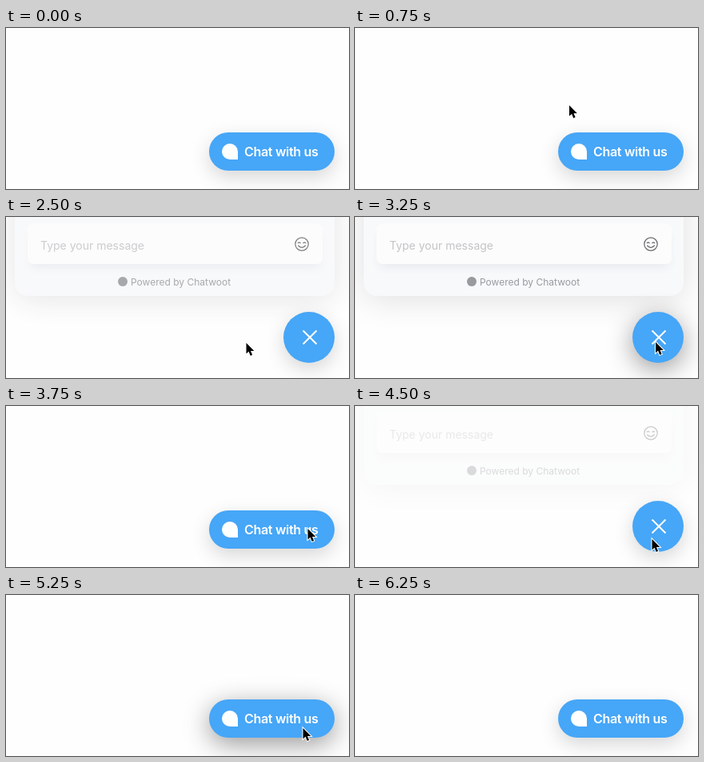
These frames come from a looping animation (429x202 px, 7000 ms). An HTML page:

```html
<!DOCTYPE html>
<html lang="en">
<head>
<meta charset="utf-8">
<title>Chat widget</title>
<style>
  html, body { margin: 0; width: 100%; height: 100%; overflow: hidden; background: #fefefe; }
  body { position: relative; font-family: Inter, sans-serif; }
  body *, svg { position: absolute; box-sizing: border-box; white-space: nowrap; }

  #panel {
    left: 11px; top: -501px; width: 400px; height: 600px; border-radius: 16px;
    background: #f8f9fb; box-shadow: 0 5px 40px rgba(0, 0, 0, .12);
  }
  .input {
    left: 16px; top: 509px; width: 369px; height: 51px; border-radius: 7px;
    background: #fcfcfc; box-shadow: 0 8px 12px -4px rgba(50, 50, 93, .08);
  }
  .placeholder { left: 16px; top: 18px; font-size: 14px; line-height: 20px; color: #c3c4c7; }
  .emoji { left: 333px; top: 16px; fill: none; stroke: #66666a; stroke-width: 1.2; stroke-linecap: round; }
  .brand { left: 145px; top: 575px; font-size: 12px; line-height: 16px; color: #999a9e; }
  .brand i { left: -16px; top: 1px; width: 12px; height: 12px; border-radius: 50%; background: #999a9e; }

  .bubble { background: #46a6f7; color: #fff; box-shadow: 0 8px 24px rgba(0, 0, 0, .16); }
  .bubble.hover { box-shadow: 0 8px 32px rgba(0, 0, 0, .4); }
  #launcher {
    left: 254px; top: 131px; width: 157px; height: 48px; border-radius: 24px;
    font-size: 16px; font-weight: 600; line-height: 48px; letter-spacing: -.3px;
  }
  #launcher i { left: 16px; top: 14px; width: 20px; height: 20px; border-radius: 50% 50% 0 50%; background: #fff; }
  #launcher span { left: 44px; }
  #close { left: 347px; top: 119px; width: 64px; height: 64px; border-radius: 50%; }
  #close i { left: 32px; top: 20px; width: 2px; height: 24px; background: #fff; transform: rotate(45deg); }
  #close i + i { transform: rotate(-45deg); }

  #cursor { left: 0; top: 0; overflow: visible; stroke: #fff; stroke-width: 2; paint-order: stroke; }
</style>
</head>
<body>
<div id="panel">
  <div class="input">
    <span class="placeholder">Type your message</span>
    <svg class="emoji" width="20" height="20">
      <circle cx="10" cy="10" r="8.2"/>
      <path d="M5.2 8.6q1.5-1.6 3 0M11.8 8.6q1.5-1.6 3 0M5.6 12q4.4 4.6 8.8 0"/>
    </svg>
  </div>
  <div class="brand"><i></i>Powered by Chatwoot</div>
</div>
<div id="launcher" class="bubble"><i></i><span>Chat with us</span></div>
<div id="close" class="bubble"><i></i><i></i></div>
<svg id="cursor" width="14" height="20"><path d="M0 0V13.6L3.1 10.8 5.2 16 7.6 15 5.5 9.9H9.8Z"/></svg>
<script>
  const LOOP = 7000;
  // Each step: start time in ms, cursor position, panel opacity, hovered
  const steps = [
    [0, null, 0, false],
    [500, [258, 35], 0, false],
    [750, [268, 97], 0, false],
    [1000, [300.5, 158], 0, false],
    [1250, [300.5, 158], 0, true],
    [2500, [300.5, 158], .85, false],
    [2750, [300.5, 158], 1, false],
    [3000, [338, 156], 1, false],
    [3250, [376, 157], 1, true],
    [3500, [377.5, 154], 1, true],
    [3750, [377.5, 154], 0, false],
    [4000, [371.5, 168], 0, true],
    [4250, [371.5, 167], 0, true],
    [4500, [371.5, 167], .35, false],
    [4750, [371.5, 167], 1, false],
    [5250, [371.5, 167], 0, true],
    [6250, null, 0, false]
  ];
  const [panel, launcher, close, cursor] =
    ['panel', 'launcher', 'close', 'cursor'].map(id => document.getElementById(id));
  const show = (el, on) => { el.style.visibility = on ? 'visible' : 'hidden'; };

  function render(now) {
    const time = now % LOOP;
    const [, point, opacity, hover] = steps.findLast(([start]) => start <= time);
    panel.style.opacity = opacity;
    show(launcher, !opacity);
    show(close, opacity);
    for (const bubble of [launcher, close]) bubble.classList.toggle('hover', hover);
    show(cursor, point);
    if (point) cursor.style.transform = `translate(${point[0]}px, ${point[1]}px)`;
  }

  function tick() {
    render(performance.now());
    requestAnimationFrame(tick);
  }
  tick();
</script>
</body>
</html>
```
